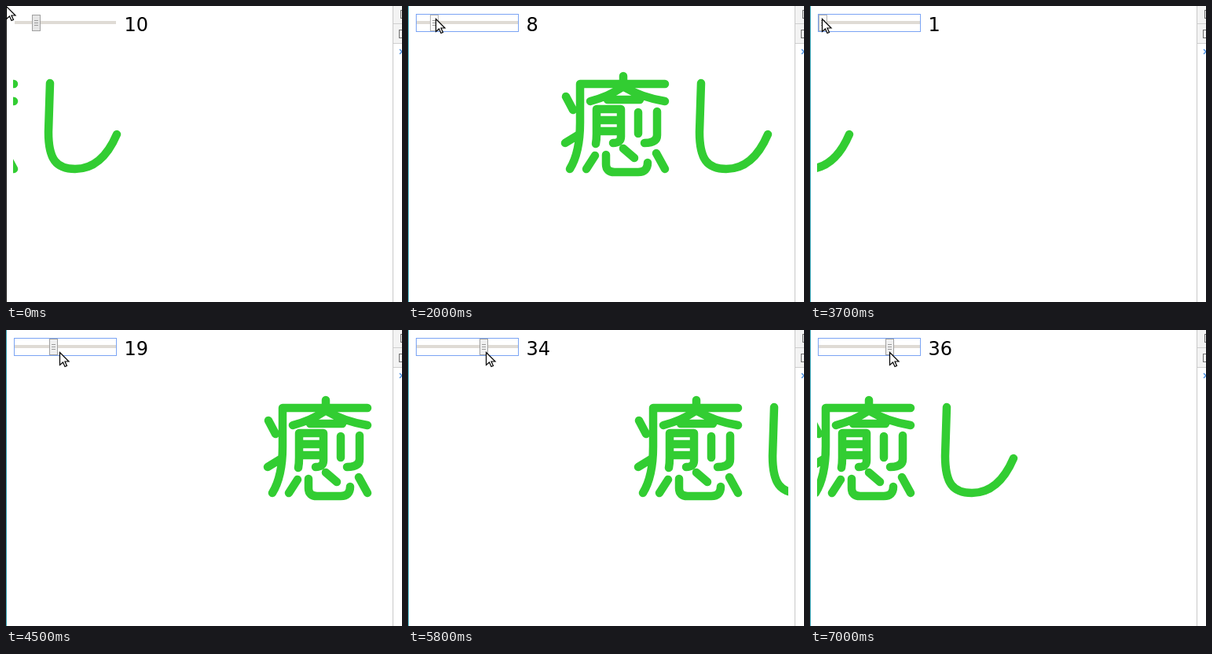
Write an HTML page with a canvas that moves like this. It is 504 by 376 pixels and loops after 7.1 s.

```html
<!DOCTYPE html>
<html lang="ja">
<head>
<meta charset="utf-8">
<title>Marquee speed</title>
<style>
  html, body { margin: 0; width: 100%; height: 100%; overflow: hidden; background: #fff; }
  canvas { display: block; }
</style>
</head>
<body>
<canvas id="stage" width="504" height="376" role="img" aria-label="癒し"></canvas>
<script>
const ctx = document.getElementById('stage').getContext('2d');
const LOOP = 7100, STEP = 100;
const VIEW = { left: 9, right: 484 };

// Strokes of the two characters, relative to the left edge of the text
const glyphs = new Path2D(`
  M85 89V99 M30 99H138
  M30 99V148Q30 186 17 207
  M12 115L21 132 M11 174L29 163
  M84 103Q66 115 43 121 M86 103Q108 116 138 121
  M65 119H106
  M50 175Q51 170 51 162V131H82V166Q82 174 72 174
  M51 145H82 M51 159H82
  M104 135V162 M128 134V164Q128 174 112 174
  M49 190L38 207
  M63 189V201Q63 211 74 211H104Q116 211 116 199
  M85 181L99 193 M127 187L138 207
  M184 98L182 160C182 195 192 207 216 207C240 207 257 191 269 163`);

const arrow = new Path2D('M.5 .5V16.5L4.5 13L7 18.5L9.5 17.5L7 12H12Z');

// Each pass across the view: start time, pixels per ms
const passes = [
  [-1027, .596], [273, .596], [1573, .69],
  [2700, .703], [4377, 1.317], [4970, .2433]
];

// time, slider value
const valueKeys = [
  [1500, 10], [1600, 8], [2200, 8], [2400, 7], [2800, 7], [3200, 1],
  [4050, 1], [4500, 19], [4850, 34], [5900, 34], [6100, 36]
];

// time, x, y
const cursorKeys = [
  [500, 0, 0], [1100, 40, 16], [1500, 40, 16], [1600, 35, 16], [2200, 35, 16],
  [2400, 30, 16], [2800, 30, 16], [3200, 15, 16], [4050, 15, 16],
  [4500, 68, 28], [4850, 99, 28], [5900, 99, 28], [6100, 101, 28]
];

function track(keys, t) {
  const next = keys.findIndex(k => k[0] > t);
  if (next === 0) return keys[0].slice(1);
  if (next < 0) return keys[keys.length - 1].slice(1);
  const a = keys[next - 1], b = keys[next];
  const p = (t - a[0]) / (b[0] - a[0]);
  return a.slice(1).map((v, i) => v + (b[i + 1] - v) * p);
}

function rect(color, x, y, w, h) {
  ctx.fillStyle = color;
  ctx.fillRect(x, y, w, h);
}

function frame(color, x, y, w, h) {
  ctx.strokeStyle = color;
  ctx.lineWidth = 1;
  ctx.strokeRect(x + .5, y + .5, w - 1, h - 1);
}

function drawText(t) {
  const [start, speed] = passes.filter(p => p[0] <= t).pop();
  ctx.save();
  ctx.beginPath();
  ctx.rect(VIEW.left, 70, VIEW.right - VIEW.left, 155);
  ctx.clip();
  ctx.translate(Math.round(VIEW.right - speed * (t - start)), 0);
  ctx.strokeStyle = '#32cd32';
  ctx.lineWidth = 10.5;
  ctx.lineCap = ctx.lineJoin = 'round';
  ctx.stroke(glyphs);
  ctx.restore();
}

function drawSlider(t) {
  const value = Math.round(track(valueKeys, t)[0]);
  const x = Math.round(11 + 2.42 * (value - 1));
  const hover = t >= 1100 && t < 4200;
  rect('#dfdbd5', 11, 19, 129, 4);
  if (t >= 1500) frame('#7ba4f4', 10, 10, 131, 23);
  rect(hover ? '#fafafa' : t < 1100 ? '#e6e6e6' : '#f0f0f0', x, 11, 11, 21);
  frame(hover ? '#b4b4b4' : '#a0a0a0', x, 11, 11, 21);
  for (const y of [18, 21, 24]) rect('#9a9a9a', x + 3, y, 5, 1);
  ctx.fillStyle = '#000';
  ctx.font = '24px "DejaVu Sans", sans-serif';
  ctx.fillText(value, 150.5, 32);
}

function drawPanel() {
  rect('#f3f3f3', 493, 0, 11, 47);
  rect('#c8c8c8', 492, 0, 1, 376);
  rect('#cfcfcf', 493, 22, 11, 1);
  rect('#cfcfcf', 493, 47, 11, 1);
  frame('#6e6e6e', 502, 5, 8, 11);
  frame('#6e6e6e', 500, 30, 11, 11);
  ctx.strokeStyle = '#4a90e2';
  ctx.lineWidth = 1.5;
  ctx.stroke(new Path2D('M501 55L504 58L501 61'));
}

function drawCursor(t) {
  const [x, y] = track(cursorKeys, t);
  ctx.save();
  ctx.translate(Math.round(x), Math.round(y));
  ctx.fillStyle = '#fff';
  ctx.strokeStyle = '#000';
  ctx.lineWidth = 1.2;
  ctx.fill(arrow);
  ctx.stroke(arrow);
  ctx.restore();
}

function draw(now) {
  const t = Math.floor((now % LOOP) / STEP) * STEP;
  rect('#fff', 0, 0, 504, 376);
  drawPanel();
  rect(t < 900 ? '#222' : '#35a3b5', 0, 0, 1, 376);
  drawText(t);
  drawSlider(t);
  drawCursor(t);
}

let origin;
function tick(now) {
  origin ??= now;
  draw(now - origin);
  requestAnimationFrame(tick);
}
draw(0);
requestAnimationFrame(tick);
</script>
</body>
</html>
```
